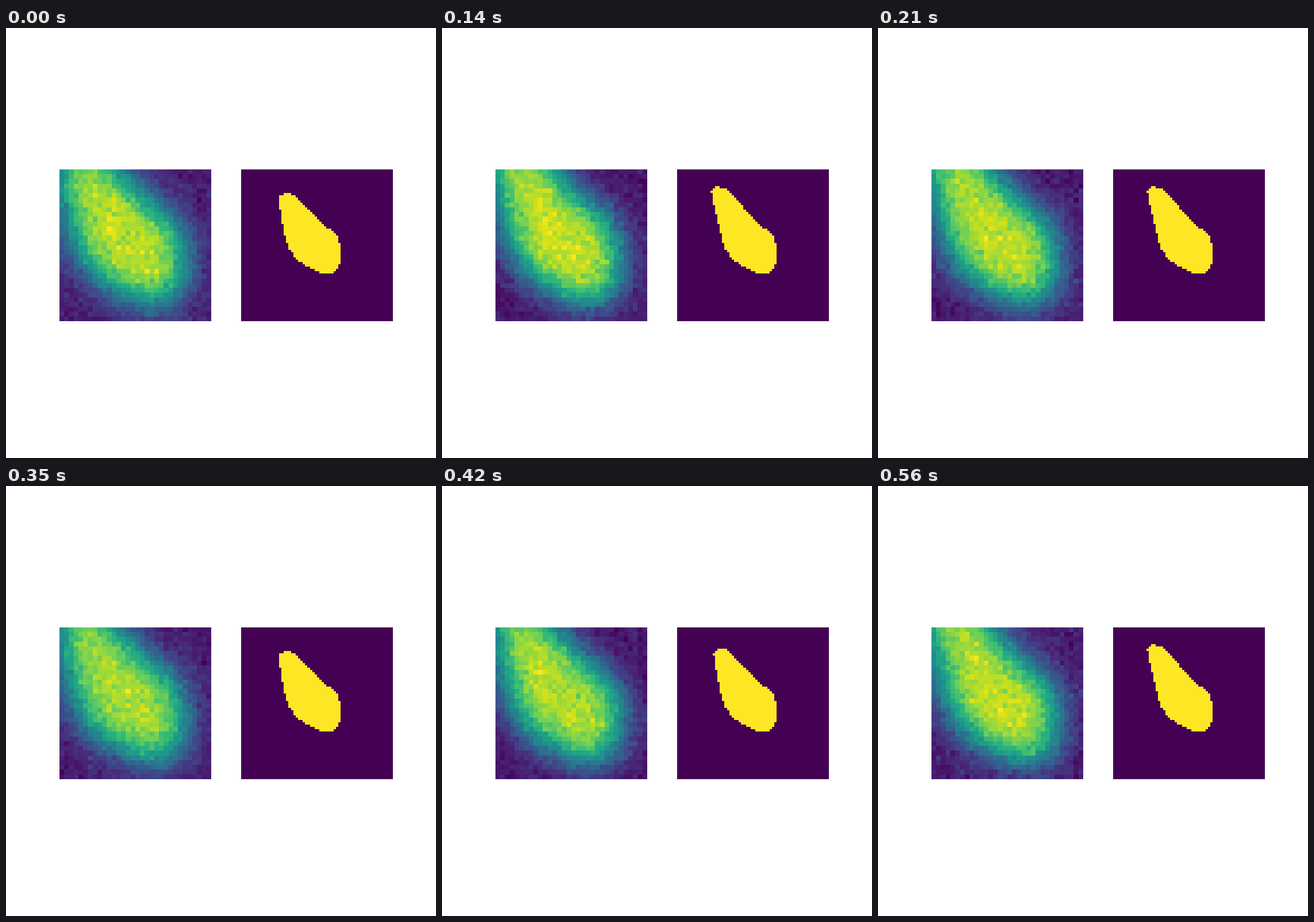
A matplotlib script that plays this animation: 748 by 748 pixels, repeating every 630 ms.

```python
import numpy as np
import matplotlib.pyplot as plt
from matplotlib.animation import FuncAnimation
from matplotlib.path import Path

STAGE, SIDE = 748, 264
GRID, CROP = 64, slice(16, 48)
STEPS = 9
SIGMA = 3.3

# Key points of the outline, clockwise from the tip, in grid cells.
OUTLINE = np.array([
    (18, 8.7), (22, 10.1), (29.3, 17.5), (35.2, 23.5), (40.2, 27.8),
    (42, 34), (41.3, 40.5), (39, 43.7), (33.5, 43.6), (24.5, 38.5),
    (20.5, 33.6), (17.6, 23.8), (15.3, 12), (15.6, 9.8),
])
TIP_SWING = np.array([1.1, 1.55])


def smooth_loop(points, n=12):
    """Closed Catmull-Rom curve through the points."""
    t = np.linspace(0, 1, n, endpoint=False)[:, None]
    a, b, c, d = (np.roll(points, k, axis=0)[:, None] for k in (1, 0, -1, -2))
    curve = b + 0.5 * t * (c - a + t * (2 * a - 5 * b + 4 * c - d
                                        + t * (3 * (b - c) + d - a)))
    return curve.reshape(-1, 2)


def cell_mask(step):
    """Cell body whose tip swings in and out, with the base at rest."""
    swing = np.cos(2 * np.pi * step / 5)
    weight = np.clip((22 - OUTLINE[:, 1:]) / 13, 0, 1)
    loop = smooth_loop(OUTLINE + swing * weight * TIP_SWING)
    rows, cols = np.mgrid[:GRID, :GRID] + 0.5
    centres = np.column_stack([cols.ravel(), rows.ravel()])
    return Path(loop).contains_points(centres).reshape(GRID, GRID).astype(float)


def blur_matrix():
    i = np.arange(GRID)
    k = np.exp(-0.5 * ((i[:, None] - i) / SIGMA) ** 2)
    return k / k.sum(axis=1, keepdims=True)


BLUR = blur_matrix()


def microscope(mask, step):
    """Blurred, noisy camera view of the middle of the mask."""
    light = (BLUR @ mask @ BLUR.T)[CROP, CROP] ** 0.85
    noise = np.random.default_rng(40 + step).normal(size=light.shape)
    view = light + (0.038 + 0.01 * light) * noise
    return (view - view.min()) / np.ptp(view)


def panel(x, y, cells):
    """Square image with its top left corner at pixel x, y."""
    ax = fig.add_axes([x / STAGE, 1 - (y + SIDE) / STAGE,
                       SIDE / STAGE, SIDE / STAGE])
    ax.axis("off")
    return ax.imshow(np.zeros((cells, cells)), cmap="viridis", vmin=0, vmax=1,
                     interpolation="nearest", aspect="auto")


fig = plt.figure(figsize=(STAGE / 100, STAGE / 100), dpi=100)
camera = panel(93, 246, 32)
truth = panel(409, 246, GRID)


def draw(step):
    mask = cell_mask(step)
    camera.set_data(microscope(mask, step))
    truth.set_data(mask)
    return camera, truth


anim = FuncAnimation(fig, draw, frames=STEPS, interval=70,
                     repeat=True, repeat_delay=0)
plt.show()
```
